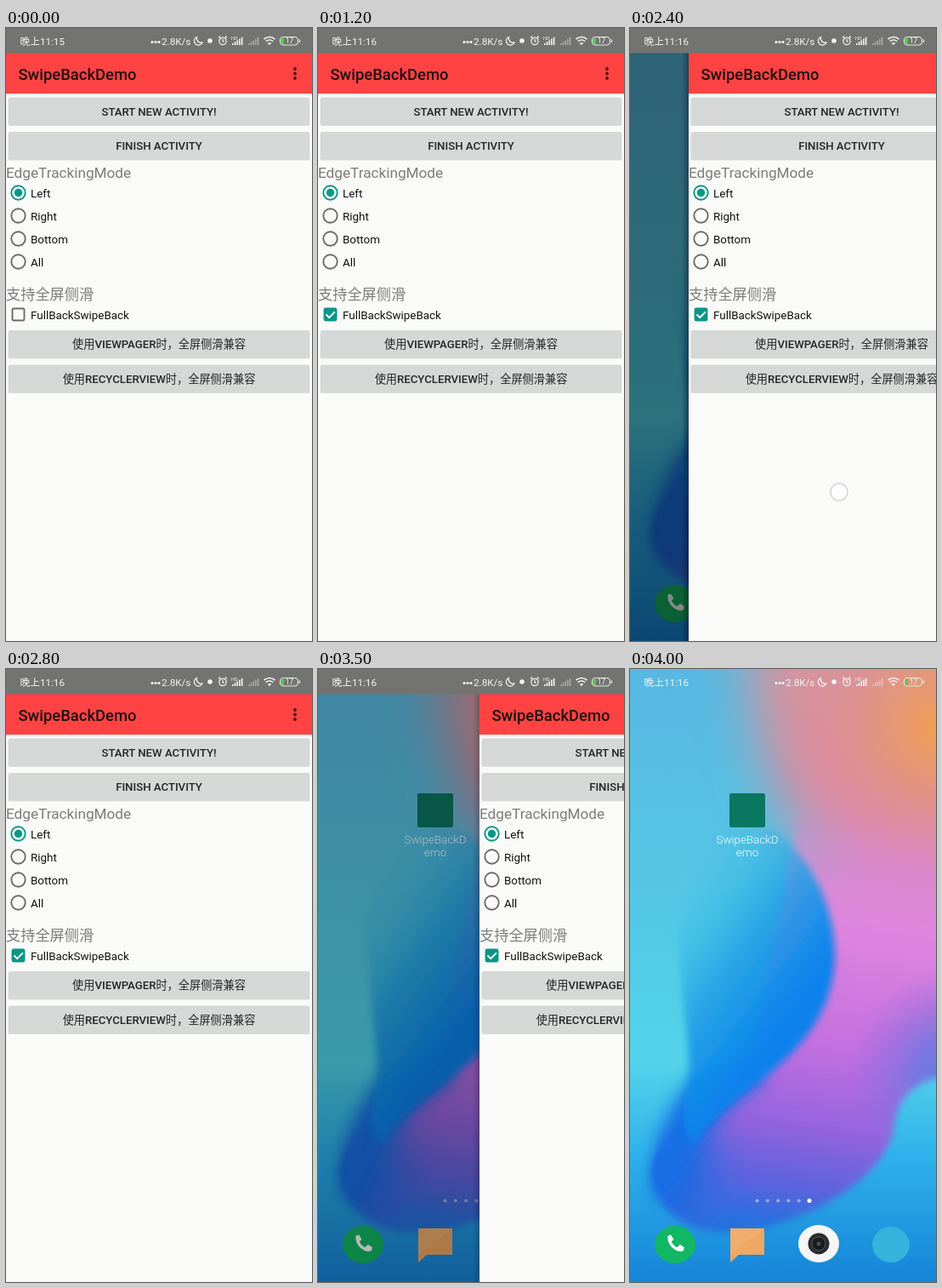
Recreate the animation shown at these times as an HTML page. Size 360 by 720 pixels, loop 4100 ms.

```html
<!DOCTYPE html>
<html lang="zh">
<head>
<meta charset="utf-8">
<title>SwipeBackDemo</title>
<style>
  html, body { margin: 0; width: 100%; height: 100%; overflow: hidden; background: #fafbf9; }
  svg { display: block; width: 100%; height: 100%; }
  text { font-family: Roboto, "Noto Sans CJK SC", "Noto Sans CJK", sans-serif; }
  .title { font-size: 18.4px; font-weight: 500; fill: #20100f; }
  .button { font-size: 13.2px; font-weight: 500; fill: #262626; text-anchor: middle; }
  .heading { font-size: 17.2px; fill: #7c7c7c; }
  .label { font-size: 13.4px; fill: #111; }
  .status { font-size: 11.7px; fill: #f4f4f4; }
  .app { font-size: 13.4px; font-weight: 300; fill: #fff; text-anchor: middle; }
</style>
</head>
<body>
<svg viewBox="0 0 360 720" preserveAspectRatio="none">
  <defs>
    <filter id="soft" filterUnits="userSpaceOnUse" x="-60" y="-60" width="520" height="840"><feGaussianBlur stdDeviation="4"/></filter>
    <filter id="softer" filterUnits="userSpaceOnUse" x="-60" y="-60" width="520" height="840"><feGaussianBlur stdDeviation="10"/></filter>
    <filter id="hazy" filterUnits="userSpaceOnUse" x="-120" y="-120" width="640" height="960"><feGaussianBlur stdDeviation="32"/></filter>
    <linearGradient id="sky" x2="0" y2="1">
      <stop stop-color="#58b8e2"/><stop offset=".35" stop-color="#54c6e4"/><stop offset=".64" stop-color="#52d4ea"/>
      <stop offset=".8" stop-color="#2db0ea"/><stop offset="1" stop-color="#1684d8"/>
    </linearGradient>
    <linearGradient id="warm" gradientUnits="userSpaceOnUse" x1="280" y1="0" x2="280" y2="320">
      <stop stop-color="#d8949c"/><stop offset=".4" stop-color="#dc8a9c"/><stop offset="1" stop-color="#dc86da"/>
    </linearGradient>
    <linearGradient id="ribbon" gradientUnits="userSpaceOnUse" x1="270" y1="170" x2="190" y2="660">
      <stop stop-color="#da8cc4" stop-opacity="0"/><stop offset=".26" stop-color="#de86de"/><stop offset=".54" stop-color="#c670e0"/>
      <stop offset=".75" stop-color="#9464de"/><stop offset=".9" stop-color="#5a64de"/><stop offset="1" stop-color="#2272de"/>
    </linearGradient>
    <linearGradient id="wave" gradientUnits="userSpaceOnUse" x1="60" y1="250" x2="215" y2="370">
      <stop stop-color="#3fbfe6" stop-opacity="0"/><stop offset=".55" stop-color="#209fe6" stop-opacity=".85"/><stop offset="1" stop-color="#0782ec"/>
    </linearGradient>
    <radialGradient id="sun" gradientUnits="userSpaceOnUse" cx="365" cy="70" r="170">
      <stop stop-color="#f2a04e"/><stop offset=".5" stop-color="#e69678" stop-opacity=".6"/><stop offset="1" stop-color="#d890a8" stop-opacity="0"/>
    </radialGradient>
    <radialGradient id="dusk" gradientUnits="userSpaceOnUse" cx="385" cy="480" r="130">
      <stop stop-color="#4a86e2"/><stop offset=".4" stop-color="#6c78e0" stop-opacity=".8"/><stop offset="1" stop-color="#9068de" stop-opacity="0"/>
    </radialGradient>
    <radialGradient id="rim" gradientUnits="userSpaceOnUse" cx="28" cy="590" r="110">
      <stop stop-color="#146ae2"/><stop offset=".5" stop-color="#2868e0" stop-opacity=".8"/><stop offset="1" stop-color="#4866e0" stop-opacity="0"/>
    </radialGradient>
    <linearGradient id="shade">
      <stop stop-opacity="0"/><stop offset="1" stop-opacity=".4"/>
    </linearGradient>
  </defs>

  <g id="home">
    <rect width="360" height="720" fill="url(#sky)"/>
    <path d="M140-60H460V430H290Q270 270 200 190Q140 110 140-60Z" fill="url(#warm)" filter="url(#hazy)"/>
    <g filter="url(#soft)">
      <path id="band" d="M420 480C350 470 314 490 309 545C298 588 240 634 160 656C85 676 28 645 25 590C34 540 90 510 140 475L200 160H420Z" fill="url(#ribbon)"/>
      <use href="#band" style="fill:url(#dusk)"/>
      <path d="M420 480C350 470 314 490 309 545C298 588 240 634 160 656C85 676 28 645 25 590C34 540 90 510 140 475L200 160H420Z" fill="url(#dusk)"/>
      <path d="M309 545C298 588 240 634 160 656C85 676 28 645 25 590C34 540 90 510 140 475Z" fill="url(#rim)"/>
    </g>
    <path d="M75 480C30 530 18 590 34 628C50 622 60 595 78 560C98 528 125 508 160 482C150 460 110 460 75 480Z" fill="#1670e4" filter="url(#softer)"/>
    <path d="M120 170C195 180 241 265 241 335C241 400 203 446 155 482C120 508 95 528 75 560C60 540 60 520 68 490C76 450 50 350 60 270Q85 190 120 170Z" fill="url(#wave)" filter="url(#soft)"/>
    <rect width="360" height="300" fill="url(#sun)"/>

    <rect x="117" y="146" width="42" height="40" rx="2" fill="#0a7760"/>
    <text class="app" x="138" y="205">SwipeBackD</text>
    <text class="app" x="138" y="220">emo</text>
    <g id="pager" fill="#fff"></g>

    <ellipse cx="53" cy="676" rx="24" ry="22" fill="#12b763"/>
    <path d="M46 667.500C46 675.500 53 682.500 61 682.500" fill="none" stroke="#fff" stroke-width="3.400"/>
    <path d="M44 666l4-1.500 3.500 5.500-4 3.500ZM55 679.500l4-3.500 5 3.500-1.500 4.500Z" fill="#fff"/>
    <path d="M118 657H158V688H128L118 697Z" fill="#efa762"/>
    <path d="M118 657H158L118 688Z" fill="#f1ad6b"/>
    <ellipse cx="222" cy="675" rx="24" ry="22" fill="#f6f6f6"/>
    <circle cx="222" cy="675" r="12.500" fill="#2a2b2d"/>
    <circle cx="222" cy="675" r="8" fill="#1a1b1d" stroke="#55575a"/>
    <circle cx="222" cy="675" r="2.500" fill="#4a4c50"/>
    <ellipse cx="307" cy="676" rx="22" ry="21" fill="#35b3dc"/>
  </g>

  <rect id="scrim" width="360" height="720"/>

  <g id="page">
    <rect id="edge" x="-8" y="29" width="8" height="691" fill="url(#shade)"/>
    <rect y="29" width="360" height="691" fill="#fafbf9"/>
    <rect y="29" width="360" height="48" fill="#ff4343"/>
    <rect y="77" width="360" height="1.500" fill="#000" opacity=".1"/>
    <text class="title" x="14.500" y="60.500">SwipeBackDemo</text>
    <g fill="#4a1515"><circle cx="340" cy="48" r="1.900"/><circle cx="340" cy="53.500" r="1.900"/><circle cx="340" cy="59" r="1.900"/></g>
    <g id="buttons"></g>
    <text class="heading" x="0" y="175.500">EdgeTrackingMode</text>
    <g id="radios"></g>
    <text class="heading" x="0" y="319">支持全屏侧滑</text>
    <rect id="box" x="7.500" y="329.500" width="14" height="14" rx="1.500" stroke-width="1.900"/>
    <path id="tick" d="M9.500 336.500l3.700 3.700 6.700-6.900" fill="none" stroke="#fff" stroke-width="1.900"/>
    <text class="label" x="29" y="341.500">FullBackSwipeBack</text>
  </g>

  <circle id="touch" r="10" fill="#fff" fill-opacity=".85" stroke="#d6d6dc" stroke-width="1.600"/>

  <rect id="bar" width="360" height="29.500" fill="#737472"/>
  <text id="clock" class="status" x="16.500" y="19.500"></text>
  <g fill="#f4f4f4">
    <circle cx="172" cy="16.500" r="1.600"/><circle cx="176" cy="16.500" r="1.600"/><circle cx="180" cy="16.500" r="1.600"/>
    <text class="status" x="183" y="19.500">2.8K/s</text>
    <circle cx="240" cy="15" r="2.800"/>
    <text x="265" y="13.500" font-size="5.500">HD</text>
  </g>
  <g fill="none" stroke="#f4f4f4" stroke-width="1.200">
    <path d="M224.500 10.500a5 5 0 1 0 6.500 6.500a5.200 5.200 0 0 1-6.500-6.500Z"/>
    <circle cx="255" cy="15.500" r="4.200"/>
    <path d="M255 13v3h2M250 11.500l2.300-2M260 11.500l-2.300-2"/>
    <path d="M303.500 13q6.500-5 13 0M305.700 15.600q4.300-3.200 8.600 0" stroke-width="1.600"/>
    <path d="M307.600 17.300h4.800l-2.400 3Z" fill="#f4f4f4" stroke="none"/>
    <rect x="322.500" y="10.500" width="21" height="9.500" rx="4" stroke="#dcebd6"/>
    <path d="M345.500 13.500v3.500"/>
  </g>
  <path d="M327 11.500h-1a2.500 2.500 0 0 0-2.500 2.500v2.500a2.500 2.500 0 0 0 2.500 2.500h1Z" fill="#54c95c"/>
  <text x="333.500" y="18.300" font-size="8.500" fill="#f4f4f4" text-anchor="middle">17</text>
  <g id="signals" fill="#f4f4f4"></g>
</svg>

<script>
const $ = id => document.getElementById(id);
const fill = (id, items, draw) => { $(id).innerHTML = items.map(draw).join(''); };
const set = (id, attrs) => Object.entries(attrs).forEach(([k, v]) => $(id).setAttribute(k, v));

const TEAL = '#089686', GREY = '#6a6b6b';

fill('buttons', [
  [81.5, 'START NEW ACTIVITY!'],
  [122, 'FINISH ACTIVITY'],
  [355, '使用VIEWPAGER时，全屏侧滑兼容'],
  [395.5, '使用RECYCLERVIEW时，全屏侧滑兼容']
], ([y, label]) => `
  <rect x="2.500" y="${y + 1}" width="355" height="32.500" rx="2" opacity=".13"/>
  <rect x="3" y="${y}" width="354" height="32" rx="1.500" fill="#d6d7d7"/>
  <text class="button" x="180" y="${y + 21}">${label}</text>`);

fill('radios', ['Left', 'Right', 'Bottom', 'All'], (label, i) => {
  const y = 193.5 + 27 * i, color = i ? GREY : TEAL;
  return `<circle cx="14.500" cy="${y}" r="8.200" fill="none" stroke="${color}" stroke-width="1.900"/>
    ${i ? '' : `<circle cx="14.500" cy="${y}" r="4.700" fill="${color}"/>`}
    <text class="label" x="29" y="${y + 5}">${label}</text>`;
});

fill('pager', [0, 1, 2, 3, 4, 5], i =>
  `<circle cx="${149.5 + 12.3 * i}" cy="624.500" r="${i < 5 ? 2 : 2.5}" opacity="${i < 5 ? 0.45 : 1}"/>`);

fill('signals', [0, 1, 2, 3, 4, 5, 6, 7, 8, 9], n => {
  const i = n % 5, faded = n > 4, h = 2 + 1.8 * i;
  return `<rect x="${(faded ? 285 : 266) + 2.7 * i}" y="${20 - h}" width="1.600" height="${h}" opacity="${faded ? 0.4 : 1}"/>`;
});

const LOOP = 4100, FRAME = 100;
const CHECKED = 600, HOME = 4000;

// Page offset as [time, x] points
const swipe = [
  [1500, 0], [1600, 5], [1800, 27], [2000, 56], [2300, 78], [2500, 60], [2600, 28], [2700, 6], [2800, 0],
  [2900, 8], [3100, 48], [3300, 108], [3500, 190], [3600, 248], [3700, 298], [3800, 337], [3900, 358], [4000, 360]
];

// Finger contacts; x is relative to the page while it is dragged
const touches = [
  { from: 400, to: 600, x: 75, y: 338 },
  { from: 1600, to: 2500, x: 177, y: 545 },
  { from: 2900, to: 3500, x: 155, y: 558 }
];

function offsetAt(t) {
  const i = swipe.findIndex(([time]) => time >= t);
  if (i < 1) return 0;
  const [t0, x0] = swipe[i - 1], [t1, x1] = swipe[i];
  return x0 + (x1 - x0) * (t - t0) / (t1 - t0);
}

function render(now) {
  const t = Math.floor(now % LOOP / FRAME) * FRAME;
  const x = offsetAt(t), covered = 1 - x / 360;
  const checked = t >= CHECKED, atHome = t >= HOME;
  const touch = touches.find(c => t >= c.from && t < c.to);

  set('page', { transform: `translate(${x} 0)`, visibility: atHome ? 'hidden' : 'visible' });
  set('scrim', { opacity: 0.58 * covered });
  set('edge', { opacity: covered });
  set('bar', { visibility: atHome ? 'hidden' : 'visible' });
  set('box', { fill: checked ? TEAL : 'none', stroke: checked ? TEAL : GREY });
  set('tick', { opacity: checked ? 1 : 0 });
  set('touch', { opacity: touch ? 1 : 0, cx: touch ? touch.x + x : 0, cy: touch ? touch.y : 0 });
  $('clock').textContent = checked ? '晚上11:16' : '晚上11:15';
}

const start = performance.now();
(function tick() {
  render(performance.now() - start);
  requestAnimationFrame(tick);
})();
</script>
</body>
</html>
```
